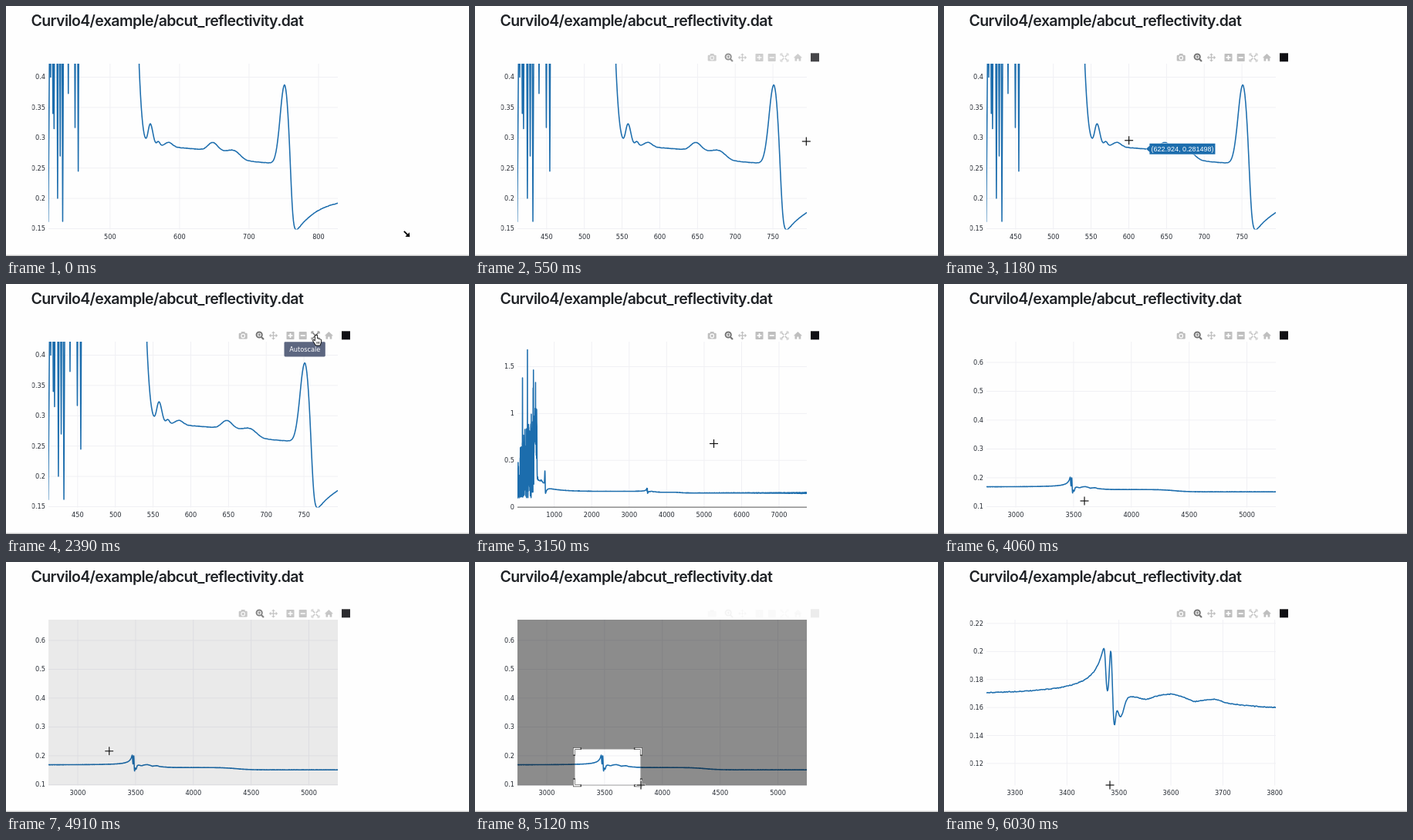
Write an HTML page with a canvas that moves like this. It is 600 px wide and 325 px high and loops after 6.18 s.

```html
<!DOCTYPE html>
<html lang="en">
<head>
<meta charset="utf-8">
<title>Reflectivity plot</title>
<style>
  html, body { margin: 0; width: 600px; height: 325px; overflow: hidden; background: #fefefe; }
  canvas { display: block; }
  h1 {
    position: absolute; left: 32.5px; top: 7px; margin: 0; white-space: nowrap; color: #1f2226;
    font: 600 19.5px/24px Inter, Roboto, sans-serif; letter-spacing: -0.6px;
  }
</style>
</head>
<body>
<canvas id="stage" width="600" height="325"></canvas>
<h1>Curvilo4/example/abcut_reflectivity.dat</h1>
<script>
const LOOP = 6180;
const BLUE = '#1c6dad', SOFT = '#bfbfbf', STRONG = '#757575', PAPER = '#fefefe';
const TICK_FONT = '8.2px "DejaVu Sans", sans-serif';
const LABEL_FONT = '9px "Liberation Sans", Arial, sans-serif';
const plot = { x: 55, y: 75, w: 375, h: 215.5 };
const ctx = document.getElementById('stage').getContext('2d');

const progress = (t, a, b) => Math.max(0, Math.min(1, (t - a) / (b - a)));
const ease = s => s * s * (3 - 2 * s);
const sigmoid = z => 1 / (1 + Math.exp(-z));
const bump = (x, center, width) => Math.exp(-(((x - center) / width) ** 2));

function random(n) {
  const v = Math.sin(n * 12.9898) * 43758.5453;
  return v - Math.floor(v);
}

// Resonances on the smooth part of the curve: center, width, height.
const resonances = [
  [530, 10.5, 0.46], [557.3, 4, 0.029], [561, 4, 0.012], [569.4, 3, 0.007], [584.4, 7.5, 0.007],
  [648, 9.5, 0.0133], [677, 10, 0.004],
  [3484.3, 3.6, 0.033], [3491, 3.5, -0.019], [3503, 9, -0.0145], [3550, 15, -0.002],
  [3600, 25, 0.0022], [3645, 15, -0.0018], [3686, 15, 0.0015]
];

function reflectivity(x) {
  const before = 0.2835 - 0.0001 * (x - 600) - 0.0125 * sigmoid((x - 689) / 4) + 0.133 * bump(x, 751.3, 9);
  const after = 0.168 + 0.042 * Math.exp((770 - x) / 380) - 0.062 * Math.exp((770 - x) / 36);
  const mix = sigmoid((x - 761) / 2);
  let y = before * (1 - mix) + after * mix;
  y -= 0.0085 * sigmoid((x - 3695) / 40) + 0.008 * sigmoid((x - 4370) / 60);
  y += 0.62 * sigmoid((3474.2 - x) / 1.2) / Math.hypot(x - 3486, 8);
  for (const [center, width, height] of resonances) y += height * bump(x, center, width);
  const noise = 0.0005 + 0.012 * Math.max(0, (x - 4000) / 3700) ** 3;
  return y + noise * (random(Math.floor(x / 2)) - 0.5);
}

// Detector noise below 541, with a few deep dips and tall towers.
const dips = [[414.4, 0.4], [417.7, 0.34], [419.4, 0.315], [424.5, 0.2], [428.2, 0.27],
  [431.8, 0.162], [439.9, 0.373], [449.6, 0.317], [454.2, 0.245], [457, 0.6]];
const towers = [[153, 1.38], [285, 1.68], [501, 1.33]];

function makeData() {
  const data = [];
  for (let x = 18; x < 412; x += 3) {
    const reach = Math.min(1, x / 50) * (0.5 + x / 900);
    data.push([x, 0.1 + random(x) ** 1.7 * reach]);
  }
  dips.forEach(([x, y], i) => {
    const gap = i ? x - dips[i - 1][0] : 2;
    data.push([x - gap / 2, 0.3 + 0.12 * gap], [x, y]);
  });
  for (let x = 459; x < 540; x += 3) data.push([x, 0.5 + 0.6 * random(x)]);
  for (const [x, y] of towers) data.find(p => p[0] === x)[1] = y;
  for (let x = 541.924; x < 7745; x++) data.push([x, reflectivity(x)]);
  return data;
}
const data = makeData();

// Pointer moves: start, end, x, y.
const moves = [
  [60, 300, 525, 300], [300, 520, 430, 176], [520, 1650, 126, 174], [1750, 2330, 402, 67],
  [2620, 3150, 309.5, 207.5], [3240, 3450, 187.4, 278], [3910, 4060, 182, 282],
  [4450, 4800, 129.5, 243.5], [4880, 5110, 215, 290]
];
const drags = [[3240, 3630], [4880, 5220]];
const barSwitches = [[350, 1], ...drags.flatMap(([a, b]) => [[a, 0], [b, 1]])];

const pointer = t => moves.reduce(([x, y], [a, b, nx, ny]) => {
  const s = ease(progress(t, a, b));
  return [x + (nx - x) * s, y + (ny - y) * s];
}, [519, 296]);

const barAlpha = t => barSwitches.reduce(
  (alpha, [at, goal]) => alpha + (goal - alpha) * progress(t, at, at + 260), 0);

function viewAt(t) {
  if (t < 2610) return { x: [411.3, 827.8 - 32.9 * ease(progress(t, 60, 300))], y: [0.1487, 0.4222] };
  if (t < drags[0][1]) return { x: [18, 7741], y: [-0.003, 1.766] };
  if (t < drags[1][1]) return { x: [2746, 5250], y: [0.0973, 0.672] };
  return { x: [3245, 3802], y: [0.1043, 0.2227] };
}

function ticks([lo, hi], count) {
  const rough = (hi - lo) / count, unit = 10 ** Math.floor(Math.log10(rough));
  const step = unit * [1, 2, 5, 10].find(n => n * unit >= rough);
  const list = [];
  for (let n = Math.ceil(lo / step); n * step <= hi; n++) list.push(+(n * step).toFixed(3));
  return list;
}

const inPlot = (x, y) => x >= plot.x && x <= plot.x + plot.w && y >= plot.y && y <= plot.y + plot.h;

function trace(points, close) {
  ctx.beginPath();
  points.forEach(([x, y]) => ctx.lineTo(x, y));
  if (close) ctx.closePath();
}

function stroke(color, width) {
  ctx.strokeStyle = color;
  ctx.lineWidth = width;
  ctx.stroke();
}

function fill(color) {
  ctx.fillStyle = color;
  ctx.fill();
}

function line(x0, y0, x1, y1, color, width) {
  trace([[x0, y0], [x1, y1]]);
  stroke(color, width);
}

function box(x, y, w, h, color, radius = 0) {
  ctx.beginPath();
  ctx.roundRect(x, y, w, h, radius);
  fill(color);
}

function ring(x, y, r, color, width) {
  ctx.beginPath();
  ctx.arc(x, y, r, 0, 7);
  stroke(color, width);
}

function text(str, x, y, align, color, font) {
  ctx.fillStyle = color;
  ctx.font = font;
  ctx.textAlign = align;
  ctx.fillText(str, x, y);
}

// Runs paint four times, a quarter turn apart, around a center.
function quarters(x, y, paint) {
  ctx.save();
  ctx.translate(x, y);
  for (let k = 0; k < 4; k++) {
    paint();
    ctx.rotate(Math.PI / 2);
  }
  ctx.restore();
}

function drawPlot(view, px, py) {
  const right = plot.x + plot.w, bottom = plot.y + plot.h;
  ctx.save();
  ctx.beginPath();
  ctx.rect(33.7, 60, 420, 260);
  ctx.clip();
  for (const v of ticks(view.x, 8)) {
    line(px(v), plot.y, px(v), bottom, '#f0f0f4', 1);
    text(String(v), px(v), 303, 'center', '#262b33', TICK_FONT);
  }
  for (const v of ticks(view.y, 6)) {
    line(plot.x, py(v), right, py(v), v === 0 ? '#555' : '#f0f0f4', 1);
    text(String(v), 51, py(v) + 3, 'right', '#262b33', TICK_FONT);
  }
  ctx.beginPath();
  ctx.rect(plot.x, plot.y, plot.w, plot.h);
  ctx.clip();
  const margin = (view.x[1] - view.x[0]) / 50;
  ctx.lineJoin = 'round';
  trace(data.filter(([x]) => x > view.x[0] - margin && x < view.x[1] + margin)
    .map(([x, y]) => [px(x), py(y)]));
  stroke(BLUE, 1.55);
  ctx.restore();
}

function drawHover(t, view, px, py) {
  const [cx, cy] = pointer(t - 58);
  if (!inPlot(cx, cy) || !inPlot(...pointer(t))) return;
  let best = 13.6, hit;
  for (const [vx, vy] of data) {
    const x = px(vx), y = py(vy), d = Math.hypot(x - cx, y - cy);
    if (d < best && inPlot(x, y)) {
      best = d;
      hit = { x, y, label: `(${+vx.toFixed(3)}, ${+vy.toFixed(6)})` };
    }
  }
  if (!hit) return;
  const { x, y, label } = hit;
  ctx.font = LABEL_FONT;
  const w = ctx.measureText(label).width + 4;
  const dir = x + w > 440 ? -1 : 1;
  const near = x + 4.5 * dir, far = near + w * dir;
  trace([[x, y], [near, y - 4], [near, y - 7], [far, y - 7], [far, y + 7], [near, y + 7], [near, y + 4]], true);
  stroke('#fff', 1);
  fill(BLUE);
  text(label, (near + far) / 2, y + 3.2, 'center', '#fff', LABEL_FONT);
}

function drawZoomBox(t, [start]) {
  const [ax, ay] = pointer(start), [bx, by] = pointer(t - 22);
  const x0 = Math.min(ax, bx), x1 = Math.max(ax, bx);
  const y0 = Math.min(ay, by), y1 = Math.max(ay, by);
  ctx.beginPath();
  ctx.rect(plot.x, plot.y, plot.w, plot.h);
  ctx.rect(x0, y0, x1 - x0, y1 - y0);
  ctx.fillStyle = `rgba(0,0,0,${0.45 * progress(t, start, start + 180)})`;
  ctx.fill('evenodd');
  if (x1 - x0 < 16 || y1 - y0 < 8) return;
  const arm = Math.min(7, (y1 - y0) / 3);
  ctx.lineJoin = 'miter';
  for (const [x, sx] of [[x0, 1], [x1, -1]]) for (const [y, sy] of [[y0, 1], [y1, -1]]) {
    trace([[x + arm * sx, y - sy], [x - sx, y - sy], [x - sx, y + arm * sy]]);
    ctx.lineCap = 'square';
    stroke('#444', 3);
    ctx.lineCap = 'butt';
    stroke('#fff', 1.7);
  }
}

function drawToolbar(t, overFit) {
  const y = 67;
  ctx.save();
  ctx.globalAlpha = barAlpha(t);
  // camera
  box(301.7, 63.7, 11, 7.8, SOFT, 1.3);
  box(304.8, 62, 4.8, 2.5, SOFT);
  ring(307.2, 67.5, 2.3, PAPER, 1.2);
  // magnifier
  ring(328.2, 66, 3.6, STRONG, 2);
  line(326.5, 66, 330, 66, STRONG, 1);
  line(328.2, 64.2, 328.2, 67.8, STRONG, 1);
  line(331, 69, 334, 72, STRONG, 2.2);
  // pan
  quarters(346.5, y, () => {
    line(0, 0, 4, 0, SOFT, 1.3);
    trace([[5.6, 0], [3.2, -2.4], [3.2, 2.4]], true);
    fill(SOFT);
  });
  // zoom in, zoom out
  for (const x of [368.5, 384.7]) {
    box(x - 5, y - 5, 10, 10, SOFT, 0.8);
    line(x - 3, y, x + 3, y, PAPER, 1.7);
  }
  line(368.5, y - 3, 368.5, y + 3, PAPER, 1.7);
  // autoscale
  const fitColor = overFit ? STRONG : SOFT;
  quarters(401, y, () => {
    trace([[2.4, -5], [5, -5], [5, -2.4]]);
    stroke(fitColor, 1);
    line(0.8, -0.8, 3.7, -3.7, fitColor, 1.5);
  });
  // home
  trace([[412.8, 67.2], [418.4, 62], [424, 67.2]], true);
  fill(SOFT);
  box(414.5, 67, 2.7, 4.6, SOFT);
  box(419.6, 67, 2.7, 4.6, SOFT);
  box(416.5, 67, 4, 1.6, SOFT);
  box(435, 61.3, 11, 11, '#101014');
  ctx.restore();
  if (overFit) {
    box(360.5, 75.3, 53.3, 19.2, '#5c6680', 1.4);
    trace([[397, 75.5], [401, 71.5], [405, 75.5]], true);
    fill('#5c6680');
    text('Autoscale', 387.2, 88, 'center', '#fff', TICK_FONT);
  }
}

function outlined(points, edge, inside) {
  trace(points, true);
  ctx.lineJoin = 'round';
  stroke(edge, 1.8);
  fill(inside);
}

function drawPointer(t, overBar) {
  const [x, y] = pointer(t);
  ctx.save();
  ctx.translate(x, y);
  if (t < 300) {
    ctx.rotate(Math.PI / 4);
    outlined([[-4.5, -0.9], [1.5, -0.9], [1.5, -3.8], [6, 0], [1.5, 3.8], [1.5, 0.9], [-4.5, 0.9]], '#fff', '#000');
  } else if (overBar) {
    outlined([[-1.2, 0], [1.2, 0], [1.3, 4], [6, 5.6], [6, 9], [4.7, 12.6], [-0.2, 12.6], [-4, 6.8],
      [-3.2, 6], [-1.2, 7.4]], '#111', '#fff');
    for (const k of [0.8, 2.4, 4]) line(k, 8, k, 10.8, '#111', 0.7);
  } else if (inPlot(x, y)) {
    for (const [color, width, r] of [['#fff', 2.6, 6], ['#111', 1.2, 5.5]]) {
      line(-r, 0, r, 0, color, width);
      line(0, -r, 0, r, color, width);
    }
  } else {
    outlined([[0, 0], [0, 11], [2.6, 8.7], [4.2, 12.2], [5.8, 11.5], [4.3, 8.1], [7.6, 8]], '#fff', '#000');
  }
  ctx.restore();
}

function draw() {
  const t = performance.now() % LOOP;
  const view = viewAt(t);
  const px = v => plot.x + (v - view.x[0]) / (view.x[1] - view.x[0]) * plot.w;
  const py = v => plot.y + (view.y[1] - v) / (view.y[1] - view.y[0]) * plot.h;
  const [x, y] = pointer(t);
  const overBar = y > 60 && y < 75 && x > 300 && x < 446;
  const drag = drags.find(([a, b]) => t > a && t < b);
  box(0, 0, 600, 325, PAPER);
  box(0, 323.7, 600, 1, '#b4b4b4');
  drawPlot(view, px, py);
  if (drag) drawZoomBox(t, drag);
  else drawHover(t, view, px, py);
  drawToolbar(t, overBar && x > 393);
  drawPointer(t, overBar);
  requestAnimationFrame(draw);
}
draw();
</script>
</body>
</html>
```
